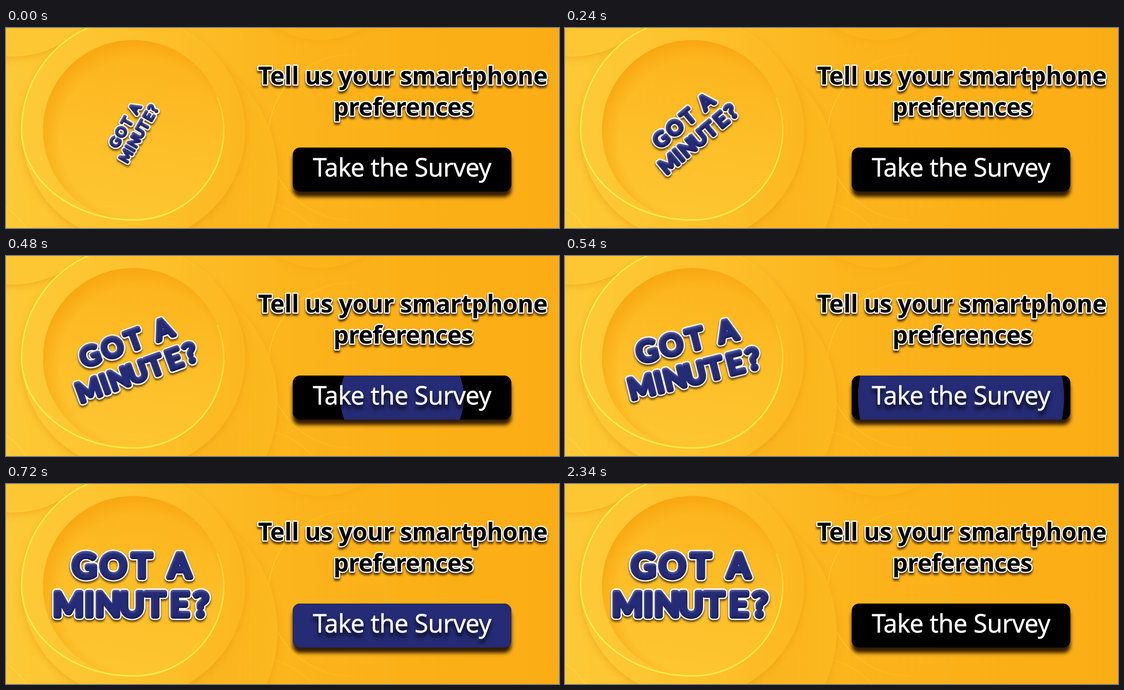
Animation of 1242x450 px, one loop 2.37 s. Source, as an HTML page:

```html
<!DOCTYPE html>
<html lang="en">
<head>
<meta charset="utf-8">
<title>Smartphone survey</title>
<style>
html, body { margin: 0; width: 100%; height: 100%; overflow: hidden; background: #fcb61e; }
svg { display: block; width: 100%; height: 100%; }
text { text-anchor: middle; }

.headline {
  font: 700 55px "Open Sans", "Noto Sans", sans-serif;
  stroke: #fff; stroke-width: 5.5; stroke-linejoin: round; paint-order: stroke;
  filter: drop-shadow(0 5px 2px rgba(50, 25, 0, .8));
}
.label {
  font: 400 56px "Open Sans", "Noto Sans", sans-serif; letter-spacing: -.4px;
  fill: #fff; stroke: #fff; stroke-width: .8;
  filter: drop-shadow(0 9px 4px rgba(0, 0, 0, .8));
}
.button { filter: drop-shadow(0 12px 4px rgba(30, 12, 0, .9)); }
.disc { filter: drop-shadow(0 5px 9px rgba(228, 135, 0, .4)); }
.line { fill: none; stroke: #ffd83c; stroke-width: 1.5; }

.lettering { font: 400 74px Lato, "Open Sans", sans-serif; stroke-linejoin: round; }
.lettering use { transform-origin: 283.5px 228px; }
.outline { fill: #fff; stroke: #fff; filter: drop-shadow(0 4px 2px rgba(50, 25, 0, .75)); }
.face { fill: #252b74; stroke: #252b74; stroke-width: 12; filter: url(#bevel); }

/* 30 ms steps; the 1 ms lead keeps step edges off the sampling instants */
.spin { animation: spin 2370ms -1ms infinite steps(4, end); }
.rim { animation: spin 2370ms -1ms infinite steps(4, end), rim 2370ms -1ms infinite steps(8, end); }
.wipe {
  transform-origin: 889.5px 318.5px;
  animation: wipe 2370ms -1ms infinite steps(6, end);
}
@keyframes spin {
  0% { transform: rotate(-60deg) scale(.41); animation-timing-function: steps(16, end); }
  20.2532% { transform: rotate(-20deg) scale(.815); }
  25.3165% { transform: rotate(-8deg) scale(.92); }
  30.3797%, 100% { transform: rotate(0deg) scale(1); }
}
/* keeps the white rim 3 px wide while the lettering grows */
@keyframes rim {
  0% { stroke-width: 26.6px; }
  10.1266% { stroke-width: 21.8px; }
  20.2532% { stroke-width: 19.4px; }
  30.3797%, 100% { stroke-width: 18px; }
}
@keyframes wipe {
  0%, 16.4557% { transform: scale(0); }
  24.0506%, 88.6075% { transform: scale(2.78); }
  88.6076% { transform: scale(2.51); animation-timing-function: steps(8, end); }
  98.7342%, 100% { transform: scale(0); }
}
</style>
</head>
<body>
<svg viewBox="0 0 1242 450" preserveAspectRatio="none">
  <defs>
    <linearGradient id="base">
      <stop offset="0" stop-color="#fdc936"/>
      <stop offset=".3" stop-color="#fdbf29"/>
      <stop offset=".5" stop-color="#fcb51d"/>
      <stop offset=".72" stop-color="#fbb018"/>
      <stop offset="1" stop-color="#fbad15"/>
    </linearGradient>
    <linearGradient id="swell" x1=".35">
      <stop offset="0" stop-color="#fdbd27" stop-opacity="0"/>
      <stop offset="1" stop-color="#fcb91f"/>
    </linearGradient>
    <linearGradient id="plate">
      <stop offset="0" stop-color="#fdca37"/>
      <stop offset=".6" stop-color="#fdc02b"/>
      <stop offset="1" stop-color="#fcb71f"/>
    </linearGradient>
    <linearGradient id="well" x1=".55" y1="0" x2=".4" y2="1">
      <stop offset="0" stop-color="#fcb31b"/>
      <stop offset=".5" stop-color="#fdbe28"/>
      <stop offset="1" stop-color="#fdc632"/>
    </linearGradient>
    <radialGradient id="hollow" gradientUnits="userSpaceOnUse" cx="302" cy="247" r="226">
      <stop offset=".8" stop-color="#f59d08" stop-opacity="0"/>
      <stop offset="1" stop-color="#f59d08" stop-opacity=".6"/>
    </radialGradient>
    <linearGradient id="gold" gradientUnits="userSpaceOnUse" x1="100" y1="400" x2="540" y2="20">
      <stop offset="0" stop-color="#ffed48"/>
      <stop offset=".62" stop-color="#ffe743"/>
      <stop offset=".9" stop-color="#ffd93c" stop-opacity="0"/>
    </linearGradient>
    <linearGradient id="fade">
      <stop offset="0" stop-color="#ffd030"/>
      <stop offset=".6" stop-color="#ffc82c" stop-opacity="0"/>
    </linearGradient>

    <filter id="bevel" filterUnits="userSpaceOnUse" x="60" y="90" width="450" height="290" color-interpolation-filters="sRGB">
      <feGaussianBlur in="SourceAlpha" stdDeviation="2" result="soft"/>
      <feOffset in="soft" dx="1" dy="3" result="down"/>
      <feOffset in="soft" dx="-1" dy="-3" result="up"/>
      <feFlood flood-color="#8f95cf" flood-opacity=".6"/>
      <feComposite in2="SourceAlpha" operator="in"/>
      <feComposite in2="down" operator="out" result="light"/>
      <feFlood flood-color="#0c0f3c" flood-opacity=".75"/>
      <feComposite in2="SourceAlpha" operator="in"/>
      <feComposite in2="up" operator="out" result="dark"/>
      <feMerge>
        <feMergeNode in="SourceGraphic"/>
        <feMergeNode in="dark"/>
        <feMergeNode in="light"/>
      </feMerge>
    </filter>

    <clipPath id="pill"><rect x="644" y="269" width="491" height="99" rx="16"/></clipPath>

    <g id="words">
      <text x="176 241 305 340 390" y="210">GOT A</text>
      <text x="140 187 229 283 335 390 438" y="297">MINUTE?</text>
    </g>
  </defs>

  <rect width="1242" height="450" fill="url(#base)"/>
  <circle class="disc" cx="705" cy="-160" r="187" fill="#fcb51c" opacity=".5"/>
  <circle cx="775" cy="246" r="186" fill="none" stroke="url(#fade)" stroke-width="1.5"/>
  <circle class="line" cx="560" cy="560" r="169" opacity=".35"/>
  <circle class="disc" cx="310" cy="330" r="300" fill="url(#swell)"/>
  <circle class="disc" cx="15" cy="-159" r="222" fill="#fdc733"/>
  <circle class="line" cx="15" cy="-159" r="222" opacity=".7"/>
  <circle class="line" cx="-130" cy="575" r="216" stroke-width="2"/>
  <circle class="disc" cx="286" cy="230" r="251" fill="url(#plate)"/>
  <circle cx="286" cy="230" r="203" fill="url(#well)"/>
  <circle cx="286" cy="230" r="203" fill="url(#hollow)"/>
  <path fill="none" stroke="url(#gold)" stroke-width="3.5"
    d="M464 52A251 251 0 0 0 35 230A252 202 0 0 0 287 432A202 202 0 0 0 489 230Q489 190 474 155"/>

  <g class="lettering">
    <g class="outline"><use class="rim" href="#words"/></g>
    <g class="face"><use class="spin" href="#words"/></g>
  </g>

  <g class="headline">
    <text x="891" y="127" letter-spacing="-.6">Tell us your smartphone</text>
    <text x="892" y="197" letter-spacing="-1.1">preferences</text>
  </g>

  <rect class="button" x="644" y="269" width="491" height="99" rx="16"/>
  <g clip-path="url(#pill)">
    <circle class="wipe" cx="889.5" cy="318.5" r="100" fill="#252b74"/>
  </g>
  <text class="label" x="889.5" y="334">Take the Survey</text>
</svg>
</body>
</html>
```
